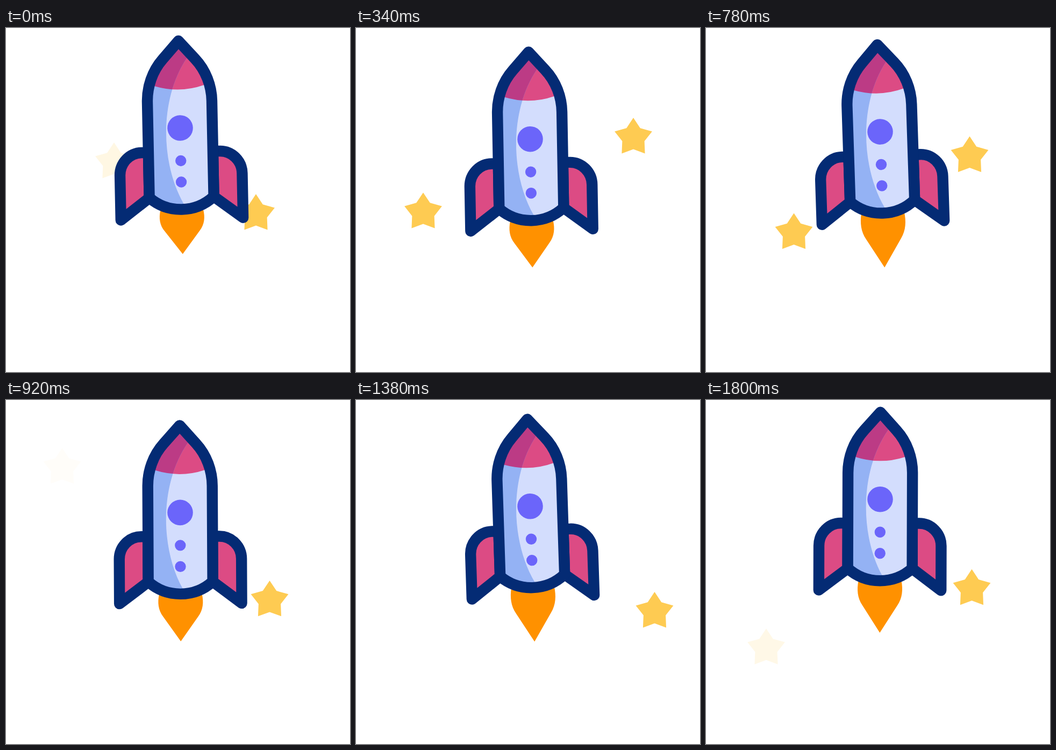
Write an HTML page that moves like this. It is 640 px wide and 640 px high and loops after 1840 ms.

```html
<!DOCTYPE html>
<html lang="en">
<head>
<meta charset="utf-8">
<title>Rocket</title>
<style>
html, body { margin: 0; width: 100%; height: 100%; overflow: hidden; background: #fff; }
svg { display: block; width: 100%; height: 100%; }
</style>
</head>
<body>
<svg viewBox="0 0 640 640">
  <defs>
    <path id="hull" d="M324 22.5L354 56C374 78 384 107 384 135V313A89.8 89.8 0 0 1 264 313V135C264 107 274 78 294 56Z"/>
    <path id="wing" d="M264 229H251.5A41 42 0 0 0 210.3 271V353.7L264 313.3Z"/>
    <path id="nose" d="M250 0H400V92L370 105.5Q324 120.5 277 105.5L250 96Z"/>
    <clipPath id="inHull"><use href="#hull"/></clipPath>
    <clipPath id="inShade"><path d="M339 55C286 130 286 250 328 326V350H250V0H339Z"/></clipPath>
  </defs>
  <g id="stars" fill="#fecb52"></g>
  <g id="rocket">
    <path id="flame" fill="#ff9100" d="M284 -10C281 6 282 22 291.5 36L324 87L356.5 36C366 22 367 6 364 -10Z"/>
    <g fill="#dc4b84" stroke="#042b74" stroke-width="20.4" stroke-linejoin="round">
      <use href="#wing"/>
      <use href="#wing" transform="matrix(-1 0 0 1 648 0)"/>
    </g>
    <g clip-path="url(#inHull)">
      <path fill="#d3ddfd" d="M250 0H400V350H250Z"/>
      <use href="#nose" fill="#dc4b84"/>
      <g clip-path="url(#inShade)">
        <path fill="#94b2f4" d="M250 0H400V350H250Z"/>
        <use href="#nose" fill="#bc3b85"/>
      </g>
    </g>
    <use href="#hull" fill="none" stroke="#042b74" stroke-width="20.4" stroke-linejoin="round"/>
    <g fill="#6b65fa">
      <circle cx="324" cy="184.5" r="23.8"/>
      <circle cx="324" cy="245.5" r="10.2"/>
      <circle cx="324" cy="285" r="10.2"/>
    </g>
  </g>
</svg>
<script>
const LOOP = 1840, CUT = 40, SPEED = 0.96;
const TOP = 124, MID = 345.8, BOTTOM = 471.5;
const $ = id => document.getElementById(id);
const sin = deg => Math.sin(deg * Math.PI / 180);
const clamp = v => Math.max(0, Math.min(1, v));

// Each star: x, time at mid height, and where it appears if not at TOP
const stars = [
  [465, 0], [516, 488], [490.5, 892], [555.5, 1330], [494.5, 1794],
  [201, 100, 241], [125, 343], [163.5, 743], [104.5, 1149], [112, 1679]
].map(([x, time, top = TOP]) => {
  const el = document.createElementNS("http://www.w3.org/2000/svg", "polygon");
  const points = Array.from({ length: 10 }, (_, i) => {
    const r = i % 2 ? 21.7 : 36.7;
    return [r * sin(i * 36), -r * sin(i * 36 + 90)];
  });
  el.setAttribute("points", points.join(" "));
  $("stars").append(el);
  return { el, x, time, top };
});

function draw(t) {
  // The loop opens on a held pose, then cuts to the slowly calming sway
  const opening = t < CUT;
  const phase = opening ? 29 : -96.5 + 0.7 * t - 3e-5 * t * t;
  const length = opening ? 73 : 82.5 + 10 * sin(0.612 * t + 3);

  const bob = 12.7 - 12.8 * sin(phase + 90);
  const tilt = -1.9 * sin(phase + 9);
  $("rocket").setAttribute("transform", `translate(0 ${bob}) rotate(${tilt} 324 184.5)`);
  $("flame").setAttribute("transform", `translate(0 346) scale(1 ${length / 87})`);

  for (const { el, x, time, top } of stars) {
    const y = MID + SPEED * (t - time);
    el.setAttribute("transform", `translate(${x} ${y})`);
    el.setAttribute("opacity", Math.min(clamp((y - top) / 55), clamp((BOTTOM - y) / 70)));
  }
}

let start;
function tick(now) {
  start ??= now;
  draw((now - start) % LOOP);
  requestAnimationFrame(tick);
}
draw(0);
requestAnimationFrame(tick);
</script>
</body>
</html>
```
